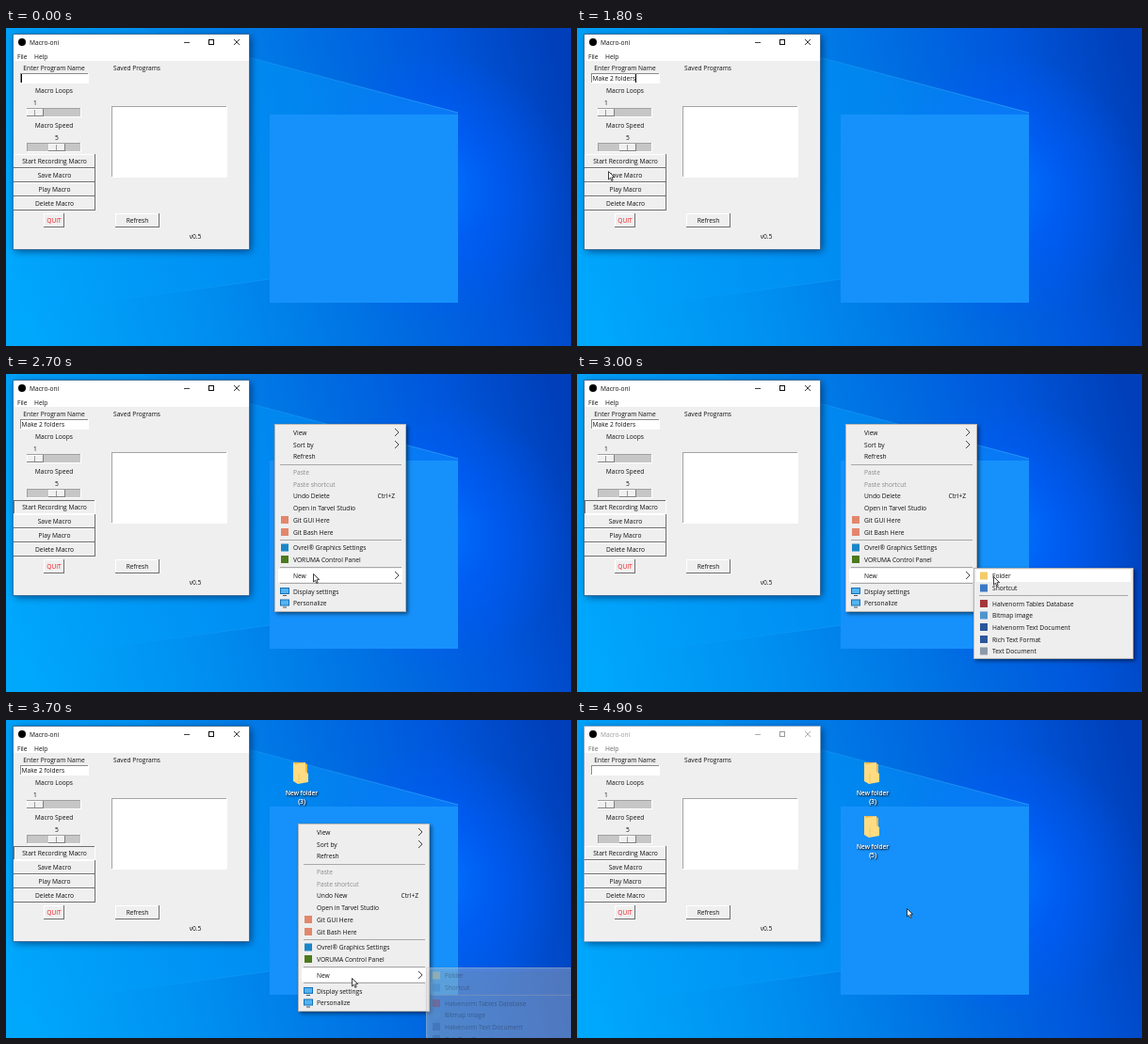
An HTML page with a canvas that plays this animation: 600x338 px, repeating every 5000 ms.

```html
<!DOCTYPE html>
<html lang="en">
<head>
<meta charset="utf-8">
<title>Macro recorder</title>
<style>
  html, body { margin: 0; width: 100%; height: 100%; overflow: hidden; background: #0078e0; }
  canvas { display: block; }
</style>
</head>
<body>
<canvas id="stage" width="600" height="338"></canvas>
<script>
const ctx = document.getElementById('stage').getContext('2d');
const LOOP = 5000, STEP = 100;
const ENTRY = 'Make 2 folders';

// pointer stops: time, x, y
const PATH = [
  [1600, 24, 168], [1800, 33, 152], [2000, 44, 142], [2100, 44, 142],
  [2400, 285, 53], [2500, 285, 53], [2700, 326, 212], [2800, 345, 214],
  [3000, 442, 215], [3100, 442, 215], [3300, 310, 110], [3400, 310, 110],
  [3700, 367, 274], [3800, 376, 273], [4000, 468, 272], [4100, 468, 272],
  [4300, 406, 219], [4600, 350, 200], [5000, 350, 200]
];

const MENU = [
  // offset, label, icon colour, hint, disabled
  [9, 'View', '', '>'], [22, 'Sort by', '', '>'], [34.5, 'Refresh'],
  [51, 'Paste', '', '', 1], [64, 'Paste shortcut', '', '', 1],
  [76.5, 'Undo', '', 'Ctrl+Z'], [89, 'Open in Tarvel Studio'],
  [102, 'Git GUI Here', '#e2876c'], [115, 'Git Bash Here', '#e2876c'],
  [131.5, 'Ovrel® Graphics Settings', '#1a86c8'],
  [144, 'VORUMA Control Panel', '#4c7a1c'],
  [161, 'New', '', '>'],
  [178, 'Display settings', 'screen'], [190.5, 'Personalize', 'screen']
];
const SUBMENU = [
  [8.5, 'Folder', '#f3cb68'], [21.5, 'Shortcut', '#3b78c4'],
  [38, 'Halvenorm Tables Database', '#a4373a'], [50.5, 'Bitmap image', '#4f94cd'],
  [63, 'Halvenorm Text Document', '#2b579a'], [76, 'Rich Text Format', '#2b579a'],
  [88.5, 'Text Document', '#8a9aa8']
];

function box(x, y, w, h, fill) {
  ctx.fillStyle = fill;
  ctx.fillRect(x, y, w, h);
}

function frame(x, y, w, h, stroke) {
  ctx.strokeStyle = stroke;
  ctx.lineWidth = 1;
  ctx.strokeRect(x + .5, y + .5, w - 1, h - 1);
}

function poly(points, fill, stroke) {
  ctx.beginPath();
  points.forEach(([x, y]) => ctx.lineTo(x, y));
  ctx.closePath();
  if (fill) { ctx.fillStyle = fill; ctx.fill(); }
  if (stroke) { ctx.strokeStyle = stroke; ctx.stroke(); }
}

function line(points, color, width = 1) {
  ctx.beginPath();
  points.forEach(([x, y]) => ctx.lineTo(x, y));
  ctx.strokeStyle = color;
  ctx.lineWidth = width;
  ctx.stroke();
}

function text(s, x, y, color = '#111', align = 'left') {
  ctx.font = '6.65px "Open Sans", "Noto Sans", sans-serif';
  ctx.textAlign = align;
  ctx.fillStyle = color;
  ctx.fillText(s, x, y + 2.8);
}

const label = (s, x, y, color) => text(s, x, y, color, 'center');

// raised or sunken 3D rectangle
function bevel(x, y, w, h, fill, sunken, dark = '#707070') {
  const [topLeft, bottomRight] = sunken ? [dark, '#fff'] : ['#fff', dark];
  box(x, y, w, h, bottomRight);
  box(x, y, w - 1, h - 1, topLeft);
  box(x + 1, y + 1, w - 2, h - 2, fill);
}

function shadow(color, blur, offset) {
  ctx.shadowColor = color;
  ctx.shadowBlur = blur;
  ctx.shadowOffsetX = ctx.shadowOffsetY = offset;
}

function gradient(g, stops) {
  stops.forEach(([p, c]) => g.addColorStop(p, c));
  return g;
}

function wallpaper() {
  box(0, 0, 600, 338, gradient(ctx.createLinearGradient(0, 240, 600, 90),
    [[0, '#00a8fc'], [.3, '#008ff0'], [.55, '#0074e4'], [.8, '#0057dc'], [1, '#003fb9']]));

  box(250, 0, 350, 338, gradient(ctx.createRadialGradient(455, 170, 20, 455, 170, 145),
    [[0, 'rgba(0,112,255,.85)'], [.35, 'rgba(0,96,255,.6)'], [1, 'rgba(0,90,255,0)']]));

  // light cone falling to the left
  poly([[480, 90], [140, 0], [0, 0], [0, 305], [280, 267], [480, 238]],
    gradient(ctx.createLinearGradient(0, 0, 480, 0),
      [[0, 'rgba(0,160,255,.1)'], [.6, 'rgba(0,160,255,.4)'], [1, 'rgba(20,150,255,.5)']]));
  const edge = gradient(ctx.createLinearGradient(100, 0, 480, 0),
    [[0, 'rgba(50,180,255,0)'], [1, 'rgba(70,190,255,.5)']]);
  line([[140, 0], [480, 90]], edge);
  line([[0, 305], [280, 267]], edge);

  box(280, 92, 200, 200, '#1691fb');
}

function slider(y, value, thumbX) {
  label(value, thumbX + 9, y - 6);
  bevel(22, y, 58, 10, '#c6c6c6', true, '#a0a0a0');
  bevel(thumbX, y + 1, 18, 8, '#f0f0f0', false, '#808080');
  box(thumbX + 8, y + 2, 1, 6, '#999');
}

function button(name, x, y, w, h, color, sunken) {
  bevel(x, y, w, h, '#f0eff0', sunken);
  label(name, x + w / 2, y + h / 2, color);
}

function appWindow(t) {
  const active = t < 4700, ink = active ? '#111' : '#999';
  const recording = t >= 2000 && active;

  shadow('rgba(0,20,60,.65)', 8, 2);
  box(8, 7, 250, 228, '#f0eff0');
  shadow('transparent', 0, 0);
  frame(7, 6, 252, 230, active ? '#3b6f9c' : '#7fa5c4');
  box(8, 7, 250, 28, '#fff');

  ctx.beginPath();
  ctx.arc(17, 15, 4, 0, 7);
  ctx.fillStyle = '#000';
  ctx.fill();
  text('Macro-oni', 25, 14.8, ink);
  line([[189, 15.5], [195, 15.5]], ink, .8);
  frame(215, 12, 6, 6, ink);
  line([[242, 12], [248, 18]], ink, .8);
  line([[248, 12], [242, 18]], ink, .8);
  const menuInk = active ? '#111' : '#666';
  text('File', 12, 30, menuInk);
  text('Help', 30, 30, menuInk);

  label('Enter Program Name', 51, 42);
  label('Saved Programs', 139, 42);
  bevel(15, 48, 73, 11, '#fff', true, '#8c8c8c');
  const typed = active ? ENTRY.slice(0, Math.max(0, Math.floor((t - 100) / 110))) : '';
  text(typed, 16.5, 53.5);
  if (t < 2000) box(Math.round(16 + ctx.measureText(typed).width), 49, 1, 9, '#000');

  label('Macro Loops', 51, 66);
  slider(85, '1', 22);
  label('Macro Speed', 51, 103.5);
  slider(122, '5', 45);

  ['Start Recording Macro', 'Save Macro', 'Play Macro', 'Delete Macro'].forEach((name, i) =>
    button(name, 8, 134 + i * 15, 87, 15, '#111', !i && recording));
  button('QUIT', 40, 197, 22, 15, '#f01818');
  button('Refresh', 116, 197, 47, 15);
  label('v0.5', 201, 221);
  bevel(112, 83, 123, 76, '#fff', true, '#a4a4a4');
}

function folder(y, number, selected) {
  if (selected) {
    box(292, y, 44, 49, 'rgba(150,200,235,.38)');
    frame(292, y, 44, 49, 'rgba(170,220,250,.5)');
  }
  poly([[305, y + 4], [315, y + 4], [320, y + 6], [320, y + 24], [305, y + 24]], '#e9b94e');
  poly([[307, y + 6], [318, y + 4], [318, y + 14], [321, y + 16], [321, y + 25], [310, y + 27], [305, y + 24], [305, y + 4]], '#ffdc82');
  line([[311, y + 16], [311, y + 26]], '#edc260', .8);
  shadow('#001428', 2, 1);
  // drawn twice to deepen the shadow
  for (let i = 0; i < 2; i++) {
    label('New folder', 314, y + 36, '#fff');
    label(number, 314, y + 45, '#fff');
  }
  shadow('transparent', 0, 0);
}

function panel(x, y, w, h) {
  shadow('rgba(0,0,0,.5)', 4, 2);
  box(x, y, w, h, '#eeeeee');
  shadow('transparent', 0, 0);
  frame(x, y, w, h, '#b4b4b4');
}

function icon(x, y, color) {
  if (color === 'screen') {
    box(x - 5, y - 4, 10, 7, '#1670b8');
    box(x - 4, y - 3, 8, 5, '#55b4f0');
    box(x - 2, y + 4, 4, 1, '#456');
  } else if (color) box(x - 4, y - 4, 8, 8, color);
}

function contextMenu(x, y, undone, t, opened) {
  panel(x, y, 140, 200);
  if (t >= opened + 200) box(x + 4, y + 154, 132, 14, '#fff');
  [43, 123, 152, 169].forEach(dy => box(x + 6, y + dy, 129, 1, '#a8a8a8'));
  MENU.forEach(([dy, name, color, hint, off]) => {
    const cy = y + dy;
    text(name === 'Undo' ? 'Undo ' + undone : name, x + 20, cy, off ? '#8a8a8a' : '#111');
    icon(x + 11, cy, color);
    if (hint === '>') line([[x + 128, cy - 4], [x + 132, cy], [x + 128, cy + 4]], '#333', .9);
    else if (hint) text(hint, x + 128, cy, '#111', 'right');
  });

  const fade = Math.min(1, (t - opened - 200) / 300);
  if (fade <= 0) return;
  ctx.globalAlpha = fade;
  const sx = x + 136, sy = y + 153;
  panel(sx, sy, 170, 97);
  if (fade === 1) box(sx + 3, sy + 2, 164, 13, '#fff');
  box(sx + 6, sy + 29, 158, 1, '#a8a8a8');
  SUBMENU.forEach(([dy, name, color]) => {
    text(name, sx + 20, sy + dy);
    icon(sx + 11, sy + dy, color);
  });
  ctx.globalAlpha = 1;
}

function pointer(t) {
  const i = PATH.findIndex(p => p[0] > t);
  if (i < 1) return;
  const [t0, x0, y0] = PATH[i - 1], [t1, x1, y1] = PATH[i];
  const k = (t - t0) / (t1 - t0);
  ctx.save();
  ctx.translate(x0 + (x1 - x0) * k, y0 + (y1 - y0) * k);
  ctx.lineWidth = .8;
  poly([[.5, .5], [.5, 9], [2.4, 7.3], [3.8, 10.4], [5.2, 9.8], [3.9, 6.8], [6.6, 6.6]], '#fff', '#111');
  ctx.restore();
}

function draw(now) {
  const t = Math.floor(now % LOOP / STEP) * STEP;
  wallpaper();
  appWindow(t);
  if (t >= 3100) folder(41, '(3)', t < 3400);
  if (t >= 4100) folder(98, '(5)', t < 4700);
  if (t >= 2500 && t < 3100) contextMenu(285, 53, 'Delete', t, 2500);
  if (t >= 3400 && t < 4100) contextMenu(310, 110, 'New', t, 3400);
  pointer(t);
}

const start = performance.now();
function tick() {
  draw(performance.now() - start);
  requestAnimationFrame(tick);
}
tick();
</script>
</body>
</html>
```
